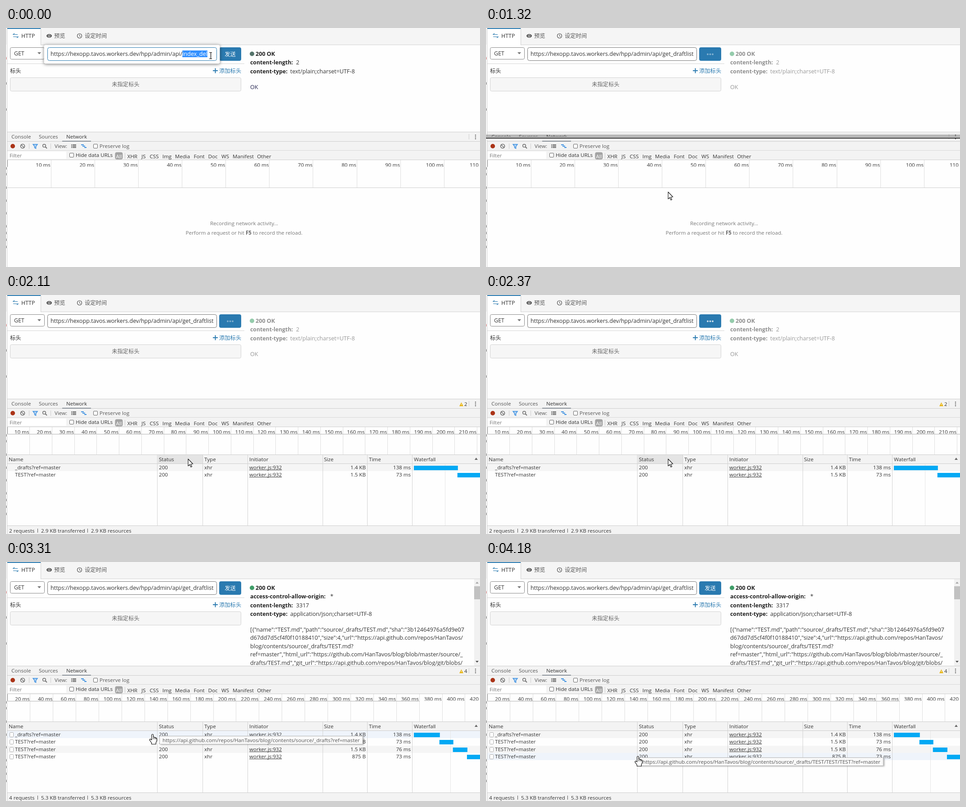
Recreate the animation shown at these times as an HTML page with a canvas. Size 1054 by 532 pixels, loop 4450 ms.

```html
<!DOCTYPE html>
<html lang="zh">
<head>
<meta charset="utf-8">
<title>HTTP request and network log</title>
<style>
html, body { margin: 0; width: 100%; height: 100%; overflow: hidden; background: #fff; }
canvas { display: block; }
</style>
</head>
<body>
<canvas id="stage" width="1054" height="532"></canvas>
<script>
const LOOP = 4450, W = 1054, H = 532;
const c = document.getElementById('stage').getContext('2d');
const FAMILY = '"Open Sans", "Noto Sans", "Noto Sans CJK SC", "Noto Sans CJK", sans-serif';
const BLUE = '#2a7ab0', LINE = '#cdcdcd', PANEL = '#f3f3f3', INK = '#333';
const UI = 11.6, BODY = 12.6, CJK = 12.3;
const BASE = 'https://hexopp.tavos.workers.dev/hpp/admin/api/';
const REPO = 'https://api.github.com/repos/HanTavos/blog/contents/source/_drafts';

const JSON_LINES = [
  '[{"name":"TEST.md","path":"source/_drafts/TEST.md","sha":"3b12464976a5fd9e07',
  'd67dd7d5cf4f0f10188410","size":4,"url":"https://api.github.com/repos/HanTavos/',
  'blog/contents/source/_drafts/TEST.md?',
  'ref=master","html_url":"https://github.com/HanTavos/blog/blob/master/source/_',
  'drafts/TEST.md","git_url":"https://api.github.com/repos/HanTavos/blog/git/blobs/'
];
const ROWS = [
  ['_drafts?ref=master', '1.4 KB', 138],
  ['TEST?ref=master', '1.5 KB', 73],
  ['TEST?ref=master', '1.5 KB', 76],
  ['TEST?ref=master', '875 B', 73]
];
const TOTALS = ['', '1.4 KB', '2.9 KB', '', '5.3 KB'];

// pointer path: time, x, y
const PATH = [
  [660, 455, 61], [750, 483, 61], [1000, 483, 61], [1150, 500, 95], [1220, 500, 95],
  [1310, 405, 365], [2710, 405, 365], [2900, 372, 412], [3100, 326, 383],
  [3340, 326, 383], [3390, 326, 397], [3640, 326, 397], [3800, 334, 420],
  [4110, 334, 420], [4180, 338, 432]
];

const ease = u => u * u * (3 - 2 * u);

function pointer(t) {
  if (t <= PATH[0][0]) return { x: PATH[0][1], y: PATH[0][2] };
  for (let i = 1; i < PATH.length; i++) {
    const [t0, x0, y0] = PATH[i - 1], [t1, x1, y1] = PATH[i];
    if (t < t1) {
      const u = ease((t - t0) / (t1 - t0));
      return { x: x0 + (x1 - x0) * u, y: y0 + (y1 - y0) * u };
    }
  }
  const last = PATH[PATH.length - 1];
  return { x: last[1], y: last[2] };
}

function text(s, x, y, size = UI, color = INK, align = 'left', weight = 400) {
  c.font = `${weight} ${size}px ${FAMILY}`;
  c.fillStyle = color;
  c.textAlign = align;
  c.fillText(s, x, y);
}

function rect(x, y, w, h, color) {
  c.fillStyle = color;
  c.fillRect(x, y, w, h);
}
const hline = (x0, x1, y, color = LINE) => rect(x0, y, x1 - x0, 1, color);
const vline = (x, y0, y1, color = LINE) => rect(x, y0, 1, y1 - y0, color);

function box(x, y, w, h, r, fill, stroke) {
  c.beginPath();
  c.roundRect(x + 0.5, y + 0.5, w - 1, h - 1, r);
  if (fill) { c.fillStyle = fill; c.fill(); }
  if (stroke) { c.strokeStyle = stroke; c.lineWidth = 1; c.stroke(); }
}

function disc(x, y, r, fill) {
  c.beginPath();
  c.arc(x, y, r, 0, 7);
  c.fillStyle = fill;
  c.fill();
}

// flat list of x, y pairs
function poly(pts, fill, stroke, width = 1, close = true) {
  c.beginPath();
  for (let i = 0; i < pts.length; i += 2) c.lineTo(pts[i], pts[i + 1]);
  if (close) c.closePath();
  if (fill) { c.fillStyle = fill; c.fill(); }
  if (stroke) { c.strokeStyle = stroke; c.lineWidth = width; c.stroke(); }
}
const stroke = (pts, color, width) => poly(pts, null, color, width, false);

function clipped(x, y, w, h, draw) {
  c.save();
  c.beginPath();
  c.rect(x, y, w, h);
  c.clip();
  draw();
  c.restore();
}

function raised(x, y, w, h, blur) {
  c.save();
  c.shadowColor = 'rgba(0,0,0,.55)';
  c.shadowBlur = blur;
  c.shadowOffsetY = 1;
  box(x, y, w, h, 4, '#fff');
  c.restore();
}

function topTabs() {
  rect(0, 0, W, 37, '#f5f5f5');
  hline(3, W, 37, '#d4d4d4');
  rect(3, 0, 74, 38, '#fff');
  rect(3, 0, 74, 2, BLUE);
  vline(77, 0, 38);
  stroke([26, 14.5, 16, 14.5, 19, 12], BLUE, 1.2);
  stroke([16, 19.5, 27, 19.5, 24, 22], BLUE, 1.2);
  text('HTTP', 34, 22, CJK);
  c.beginPath();
  c.ellipse(96, 17.5, 6, 4, 0, 0, 7);
  c.fillStyle = '#555';
  c.fill();
  disc(96, 17.5, 2.6, '#f5f5f5');
  disc(96, 17.5, 1.7, '#555');
  text('预览', 107, 22, CJK, '#555');
  c.beginPath();
  c.arc(163.5, 17.5, 5, 0, 7);
  c.strokeStyle = '#555';
  c.lineWidth = 1.2;
  c.stroke();
  stroke([163.5, 14, 163.5, 18, 166, 19], '#555', 1);
  text('设定时间', 175, 22, CJK, '#555');
}

function requestForm(t, p) {
  const focused = t < 1000, loading = t >= 1220 && t < 2420;
  hline(3, 530, 79, '#d6d6d6');
  box(9, 43, 77, 27, 3, '#fff', '#888');
  text('GET', 18, 61, CJK);
  poly([70, 54, 78, 54, 74, 58.5], '#777');

  const hover = !loading && t >= 660 && p.x > 474 && p.x < 523 && p.y > 43 && p.y < 73;
  if (t >= 1000 && t < 1220) {
    const e = 8 * ease(Math.min(1, (t - 1000) / 150));
    raised(474 - e, 43 - e, 49 + 2 * e, 30 + 2 * e, e);
  }
  box(474, 43, 49, 30, 3, hover ? '#256b9b' : BLUE, hover ? '#256b9b' : BLUE);
  if (loading) {
    c.globalAlpha = 0.82 * (0.5 - 0.5 * Math.cos(2 * Math.PI * (t - 1720) / 1600));
    for (const x of [493, 498.5, 504]) disc(x, 58.5, 2, '#fff');
    c.globalAlpha = 1;
  } else {
    text('发送', 498.5, 62.5, CJK, '#fff', 'center');
  }

  if (t < 30) raised(84, 37, 392, 43, 7);
  box(92, 43, 377, 30, 4, '#fff', focused ? BLUE : '#777');
  clipped(96, 45, 365.5, 26, () => {
    if (t < 500) {
      text(BASE, 99, 62, BODY);
      const x = 99 + c.measureText(BASE).width;
      const w = c.measureText('index_del').width;
      rect(x, 50, w, 15, '#3390ff');
      text('index_del', x, 62, BODY, '#fff');
    } else {
      text(BASE + 'get_draftlist', focused ? 97.5 : 99, 62, BODY);
      if (focused) vline(460, 50, 65, '#222');
    }
  });

  text('标头', 9, 100, CJK, INK, 'left', 500);
  rect(460, 94, 11, 2, BLUE);
  rect(464.5, 89.5, 2, 11, BLUE);
  text('添加标头', 474, 100, CJK, BLUE);
  box(9, 110, 514, 31, 3, '#f6f6f6', '#d2d2d2');
  text('未指定标头', 266, 129.5, CJK, '#666', 'center');
}

function response(t) {
  const done = t >= 2420, dim = t >= 1220 && !done;
  const strong = dim ? '#8e8e8e' : '#222', ink = dim ? '#999' : INK;
  disc(547, 57.5, 5, done ? '#3f9d68' : dim ? '#94cbab' : '#54736a');
  text('200 OK', 555, 62, 12.6, strong, 'left', 700);
  const heads = done
    ? [['access-control-allow-origin:', '*', 721], ['content-length:', '3317', 645],
       ['content-type:', 'application/json;charset=UTF-8', 632]]
    : [['content-length:', '2', 645], ['content-type:', 'text/plain;charset=UTF-8', 632]];
  heads.forEach(([key, value, x], i) => {
    const y = 81.3 + i * 19.4;
    text(key, 543, y, 12.3, strong, 'left', 700);
    text(value, x, y, BODY, ink);
  });
  if (!done) {
    text('OK', 543, 136, BODY, dim ? '#999' : '#2b2b55');
    return;
  }
  clipped(540, 140, 490, 91, () =>
    JSON_LINES.forEach((s, i) => text(s, 543, 155 + i * 18.4, BODY)));
  rect(1041, 38, 13, 193, '#f1f1f1');
  rect(1041, 54, 13, 29, '#c1c1c1');
  poly([1044, 48, 1051, 48, 1047.5, 44], '#a3a3a3');
  poly([1044, 220, 1051, 220, 1047.5, 224], '#505050');
}

function checkbox(x, y) {
  box(x, y, 10, 10, 1.5, '#fff', '#666');
}

function devtoolsBars(rows) {
  rect(3, 231, W, 63, PANEL);
  hline(3, W, 231);
  hline(3, W, 252);
  hline(3, W, 272, '#d8d8d8');
  hline(3, W, 293);
  text('Console', 12, 246, UI, '#555');
  text('Sources', 73, 246, UI, '#555');
  text('Network', 134, 246, UI, INK);
  rect(125, 251, 64, 2, '#8a9199');
  vline(1029, 236, 248);
  for (const y of [238.5, 242.5, 246.5]) disc(1044, y, 1.2, '#666');
  if (rows > 1) {
    poly([1008, 247.5, 1017, 247.5, 1012.5, 239], '#e8b410');
    vline(1012, 242, 245, '#fff');
    text(String(rows), 1019, 247, UI);
  }

  const gray = '#6e6e6e', hot = '#3a8ee0';
  disc(15, 263, 5, '#ab3418');
  c.beginPath();
  c.arc(37, 263, 4.5, 0, 7);
  c.strokeStyle = gray;
  c.lineWidth = 1.7;
  c.stroke();
  stroke([34, 260, 40, 266], gray, 1.5);
  vline(51, 257, 269);
  vline(99, 257, 269);
  poly([60, 259, 70, 259, 66.5, 263.5, 66.5, 268, 63.5, 266.5, 63.5, 263.5], '#b7d6f4', hot, 1.4);
  c.beginPath();
  c.arc(85, 262, 3.3, 0, 7);
  c.strokeStyle = gray;
  c.lineWidth = 1.5;
  c.stroke();
  stroke([87.5, 264.5, 91, 268], gray, 1.8);
  text('View:', 108, 267, UI, '#555');
  for (const y of [259, 262, 265]) {
    rect(145, y, 2, 2, gray);
    rect(148, y, 8, 2, gray);
  }
  rect(167, 259, 6, 2, hot);
  rect(170, 262, 6, 2, hot);
  rect(174, 265, 5, 2, hot);
  checkbox(194, 258);
  text('Preserve log', 208, 267, UI, '#555');

  rect(3, 275, 131, 16, '#fff');
  text('Filter', 8, 288, UI, '#777');
  checkbox(141, 278);
  text('Hide data URLs', 155, 287, UI);
  box(242, 276, 18, 17, 4, '#a3a3a3');
  text('All', 251, 290, UI, '#fff', 'center');
  vline(264, 278, 291);
  const kinds = { XHR: 281, JS: 306, CSS: 329.5, Img: 358, Media: 392.5, Font: 429.5,
    Doc: 460, WS: 487.5, Manifest: 527.5, Other: 574 };
  for (const k in kinds) text(k, kinds[k], 290, UI, INK, 'center');
}

function timeline(span, rows) {
  const unit = 1051 / span, step = unit * 10 < 48 ? 20 : 10;
  clipped(3, 294, W, 61, () => {
    for (let ms = step; 3 + ms * unit < W + 60; ms += step)
      vline(Math.floor(3 + ms * unit), 294, 355, '#dedede');
  });
  clipped(3, 294, W, 14.5, () => {
    for (let ms = step; 3 + ms * unit < W + 60; ms += step)
      text(ms + ' ms', 3 + ms * unit - 1.3, 309, UI, INK, 'right');
  });
  vline(3, 294, 309, '#999');
  if (rows) rect(3, 309, rows > 2 ? 917 : W, 1.5, '#c9c9c9');
  hline(3, W, 355);
}

function table(rows, hover, p, t) {
  rect(3, 356, W, 20, PANEL);
  if (p.y < 376) rect(338, 356, 99, 20, '#e4e4e4');
  hline(3, W, 375);
  const heads = { Name: 6, Status: 340, Type: 441, Initiator: 541, Size: 707, Time: 807, Waterfall: 907 };
  for (const k in heads) text(k, heads[k], 370, UI);
  poly([1042, 367, 1049, 367, 1045.5, 362], '#666');
  const pitch = 16.35;
  for (let i = 0; i < rows; i++) {
    const y = Math.round(376 + i * pitch);
    if (i === hover) rect(3, y, W, 16, '#eff4fb');
    else if (i % 2 === 0) rect(3, y, W, 16, '#f5f5f5');
  }
  for (const x of [336, 437, 537, 704, 803, 903]) vline(x, 356, 513, '#d3d3d3');
  vline(rows > 2 ? 988 : 976, 376, 513, '#e6e6e6');

  // requests run one after another and fill the waterfall column
  const scale = 148 / ROWS.slice(0, rows).reduce((sum, row) => sum + row[2], 0);
  let start = 907;
  for (let i = 0; i < rows; i++) {
    const [name, size, ms] = ROWS[i], y = 388 + i * pitch;
    if (t >= 2450) box(8, Math.round(y - 9), 9, 11, 1, '#fff', '#aaa');
    text(name, 20, y);
    text('200', 340, y);
    text('xhr', 441, y);
    text('worker.js:932', 541, y);
    hline(541, 541 + c.measureText('worker.js:932').width, Math.round(y + 1), '#444');
    text(size, 800, y, UI, INK, 'right');
    text(ms + ' ms', 900, y, UI, INK, 'right');
    rect(start, Math.round(y - 8), ms * scale + 1, 10, '#03a9f4');
    start += ms * scale;
  }

  rect(3, 513, W, 19, PANEL);
  hline(3, W, 513);
  text(rows + ' requests', 7, 528.5);
  vline(70, 520, 529, '#555');
  text(TOTALS[rows] + ' transferred', 78, 528.5);
  vline(181, 520, 529, '#555');
  text(TOTALS[rows] + ' resources', 189, 528.5);
}

function emptyNote() {
  text('Recording network activity...', 529.5, 438.5, UI, '#777', 'center');
  text('Perform a request or hit ', 399.5, 459.5, UI, '#777');
  let x = 399.5 + c.measureText('Perform a request or hit ').width;
  text('F5', x, 459.5, UI, '#666', 'left', 700);
  x += c.measureText('F5').width;
  text(' to record the reload.', x, 459.5, UI, '#777');
}

function tooltip(s, y) {
  const size = 11.65;
  c.font = `400 ${size}px ${FAMILY}`;
  const w = c.measureText(s).width + 13;
  c.save();
  c.shadowColor = 'rgba(0,0,0,.3)';
  c.shadowBlur = 3;
  c.shadowOffsetX = c.shadowOffsetY = 2;
  rect(342, y, w, 18, '#f9f9f9');
  c.restore();
  box(341, y, w + 1, 19, 0, '#f9f9f9', '#b5b5b5');
  text(s, 348, y + 13.5, size, '#555');
}

function cursor(kind, p) {
  c.save();
  c.translate(p.x, p.y);
  c.lineJoin = 'round';
  if (kind === 'beam') {
    stroke([-3, -6.5, 3, -6.5], '#111', 1);
    stroke([-3, 7.5, 3, 7.5], '#111', 1);
    stroke([0.5, -6.5, 0.5, 7.5], '#111', 1.3);
  } else if (kind === 'arrow') {
    poly([0, 0, 0, 15.5, 3.6, 12.3, 6, 18, 8.4, 17, 6, 11.3, 10.6, 11], '#fff', '#111', 1.1);
  } else {
    c.beginPath();
    c.moveTo(-2, 13);
    c.lineTo(-2, 1.5);
    c.quadraticCurveTo(-0.2, -1, 1.6, 1.5);
    c.lineTo(1.6, 7);
    c.quadraticCurveTo(3.5, 5.8, 4.8, 7.8);
    c.quadraticCurveTo(6.5, 6.8, 7.4, 8.8);
    c.quadraticCurveTo(9.4, 8.2, 9.5, 11);
    c.lineTo(9.4, 15);
    c.lineTo(7.4, 19);
    c.lineTo(7.4, 22.5);
    c.lineTo(-2.2, 22.5);
    c.lineTo(-2.4, 19.5);
    c.lineTo(-6.8, 13.2);
    c.quadraticCurveTo(-6.4, 10.2, -4, 11.5);
    c.closePath();
    c.fillStyle = '#fff';
    c.fill();
    c.strokeStyle = '#111';
    c.lineWidth = 1.2;
    c.stroke();
    for (const x of [1.6, 4.8, 7.3]) stroke([x, 8, x, 11.5], '#111', 1);
  }
  c.restore();
}

function pointerKind(t, p) {
  if (p.x < 470 && p.y < 75) return 'beam';
  if (p.y < 73 || (t > 2900 && p.x < 345)) return 'hand';
  return 'arrow';
}

function sweepLine() {
  const g = c.createLinearGradient(0, 235, 0, 243);
  g.addColorStop(0, 'rgba(60,60,60,0)');
  g.addColorStop(1, 'rgba(60,60,60,.6)');
  rect(0, 235, W, 7, g);
  rect(0, 242, W, 2, '#e4e4e4');
  rect(0, 244, W, 2, '#222');
}

function leftEdge() {
  vline(2, 0, H, '#cfcfcf');
  clipped(0, 0, 2, H, () => {
    for (const y of [126, 184, 315, 328, 358, 387, 415, 444, 459, 474, 490])
      text('a', -4.5, y, 11, '#222');
    text('a', -4.5, 70, 11, '#c33');
  });
}

function draw(t) {
  const p = pointer(t);
  const rows = t < 1770 ? 0 : t < 2050 ? 1 : t < 2420 ? 2 : 4;
  const span = [108.2, 143, 211.3, 0, 413][rows];
  const hover = t > 2710 && p.y >= 376 ? Math.floor((p.y - 376) / 16.35) : -1;

  rect(0, 0, W, H, '#fefefe');
  topTabs();
  requestForm(t, p);
  response(t);
  devtoolsBars(rows);
  timeline(span, rows);
  if (rows) table(rows, hover, p, t);
  else emptyNote();
  leftEdge();
  if (t >= 1290 && t < 1350) sweepLine();
  if (t >= 3310 && t < 3380) tooltip(REPO + '?ref=master', 387);
  if (t >= 4180) tooltip(REPO + '/TEST/TEST/TEST?ref=master', 435);
  cursor(pointerKind(t, p), p);
}

const begin = performance.now();
function tick() {
  draw((performance.now() - begin) % LOOP);
  requestAnimationFrame(tick);
}
tick();
</script>
</body>
</html>
```
